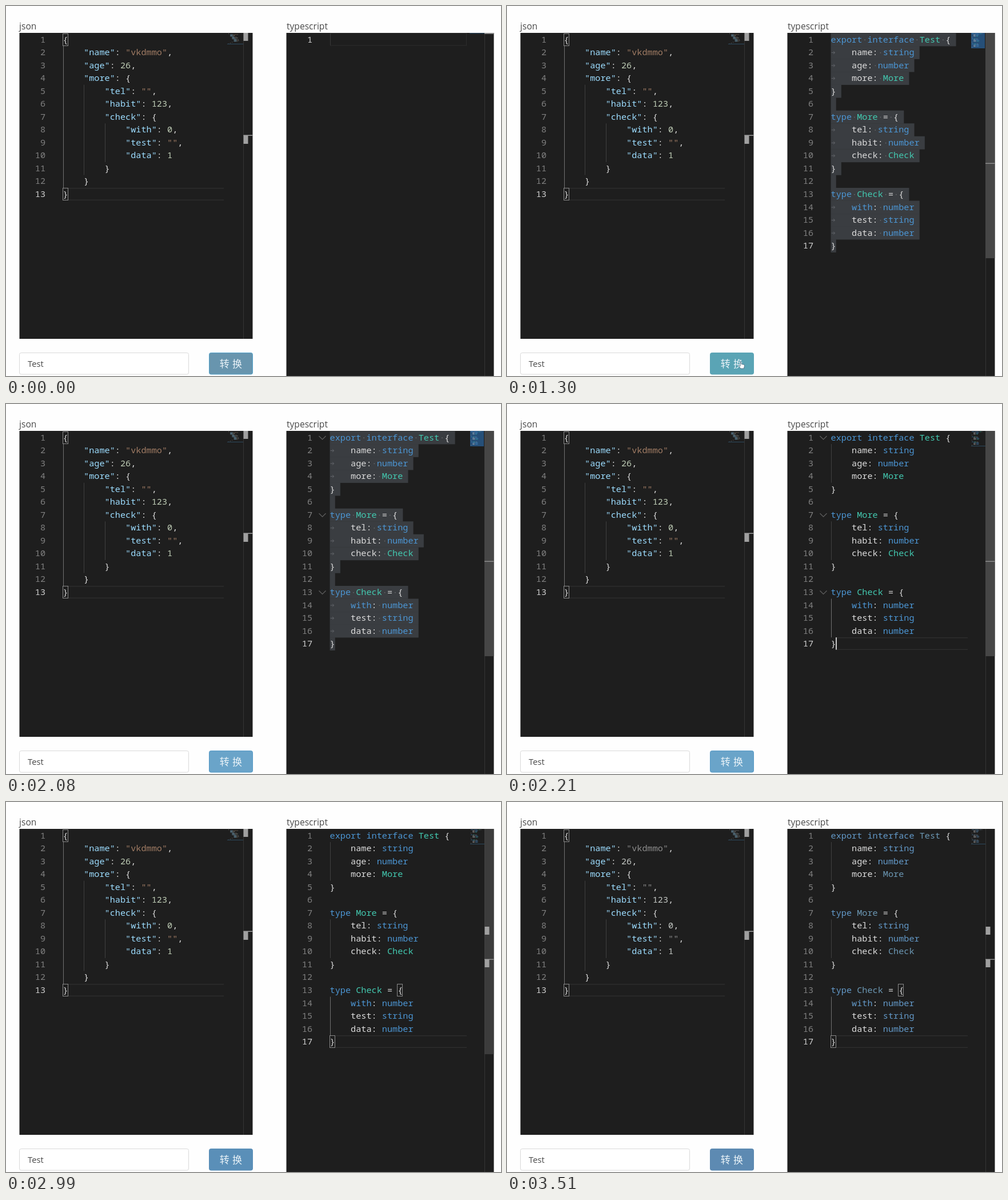
Animation, 866 px wide and 647 px high, one loop 3640 ms. Source, as an HTML page with a canvas:

```html
<!DOCTYPE html>
<html lang="en">
<head>
<meta charset="utf-8">
<title>json to typescript</title>
<style>
html, body { margin: 0; width: 100%; height: 100%; overflow: hidden; background: #fefefe; }
canvas { display: block; }
</style>
</head>
<body>
<canvas id="stage" width="866" height="647"></canvas>
<script>
const ctx = document.getElementById('stage').getContext('2d');
const LOOP = 3640, STEP = 130;
const TOP = 47.5, ROW = 22.54, COL = 9.125;
const MONO = '15.2px "Noto Sans Mono", "DejaVu Sans Mono", monospace';
const SANS = '"Open Sans", "Noto Sans", sans-serif';
const LEFT_X = 99.6, RIGHT_X = 566.6;

const json = `{
    "name": "vkdmmo",
    "age": 26,
    "more": {
        "tel": "",
        "habit": 123,
        "check": {
            "with": 0,
            "test": "",
            "data": 1
        }
    }
}`.split('\n');

const types = `export interface Test {
    name: string
    age: number
    more: More
}

type More = {
    tel: string
    habit: number
    check: Check
}

type Check = {
    with: number
    test: string
    data: number
}`.split('\n');

const bright = { key: '#9cdcfe', str: '#a07c64', num: '#bfcdb6', word: '#4c96d4', type: '#43c9b0', text: '#dcdcdc' };
const muted = { ...bright, str: '#8c8c8c', num: '#c4c8c4', word: '#6399c8', type: '#6c98b4' };

// Moments in ms
const T = { hand: 780, press: 1170, output: 1300, folds: 1820, click: 2210, match: 2340, caretOff: 2600, leave: 2600, fade: 2860, dull: 3380 };

const clamp = v => Math.max(0, Math.min(1, v));
const rowY = i => TOP + i * ROW;

function rect(x, y, w, h, color) {
  ctx.fillStyle = color;
  ctx.fillRect(x, y, w, h);
}

function box(x, y, w, h, color) {
  ctx.strokeStyle = color;
  ctx.lineWidth = 1;
  ctx.strokeRect(x, y, w, h);
}

function label(str, x, y, font, color, align = 'left') {
  ctx.font = font;
  ctx.fillStyle = color;
  ctx.textAlign = align;
  ctx.fillText(str, x, y);
}

function kindOf(token, rest) {
  if (token[0] === '"') return rest[0] === ':' ? 'key' : 'str';
  if (/^\d/.test(token)) return 'num';
  if (/^(export|interface|type|string|number|with)$/.test(token)) return 'word';
  return /^[A-Z]/.test(token) ? 'type' : 'text';
}

function tokens(line) {
  return [...line.matchAll(/"[^"]*"|\w+|[^\s\w]/g)].map(m => ({
    str: m[0], col: m.index, kind: kindOf(m[0], line.slice(m.index + m[0].length))
  }));
}

function code(lines, x, colors) {
  lines.forEach((line, i) => {
    for (const k of tokens(line)) label(k.str, x + k.col * COL, rowY(i) + 16, MONO, colors[k.kind]);
  });
}

function lineNumbers(count, x, active) {
  for (let i = 1; i <= count; i++) {
    label(i, x, rowY(i - 1) + 16, MONO, i === active ? '#cfcfcf' : '#808080', 'right');
  }
}

function guide(x, from, to, color) {
  rect(Math.round(x), rowY(from), 1, (to - from) * ROW, color);
}

function bracket(x, col, row) {
  box(Math.round(x + col * COL) - 0.5, Math.round(rowY(row)) + 0.5, 9, 21, '#8a8a8a');
}

function currentLine(x, end, row) {
  const y = Math.round(rowY(row));
  rect(x, y, end - x, 1.5, '#2d2d2d');
  rect(x, y + 20.5, end - x, 1.5, '#2d2d2d');
}

function minimap(lines, x, colors) {
  ctx.globalAlpha = 0.5;
  lines.forEach((line, i) => {
    for (const k of tokens(line)) rect(x + k.col * 0.8, 48 + i * 1.47, k.str.length * 0.75, 1, colors[k.kind]);
  });
  ctx.globalAlpha = 1;
}

function leftPane(colors) {
  rect(23.5, 47, 408, 535, '#1e1e1e');
  rect(415, 47, 1, 535, '#343434');
  lineNumbers(13, 69, 13);
  currentLine(109, 381, 12);
  guide(LEFT_X, 1, 12, '#707070');
  guide(LEFT_X + 4 * COL, 4, 11, '#404040');
  guide(LEFT_X + 8 * COL, 7, 10, '#404040');
  bracket(LEFT_X, 0, 0);
  bracket(LEFT_X, 0, 12);
  code(json, LEFT_X, colors);
  minimap(json, 389, colors);
  rect(387, 66, 28, 1, '#2c4a5e');
  rect(415.5, 47, 8, 14, '#a0a0a0');
  rect(415.5, 225.5, 16, 1.5, '#a0a0a0');
  rect(415.5, 226, 8, 15, '#a0a0a0');
}

function selection() {
  types.forEach((line, i) => {
    const cols = line.length + (i < types.length - 1 ? 1 : 0);
    rect(RIGHT_X, rowY(i), cols * COL, ROW + 0.3, '#3a3d41');
    [...line].forEach((ch, c) => {
      if (ch !== ' ') return;
      const x = RIGHT_X + c * COL, y = rowY(i) + 11;
      if (c >= 4) rect(x + 4, y, 1.5, 1.5, '#6a6d70');
      else if (c === 0) arrow(x + 1, y);
    });
  });
}

function arrow(x, y) {
  ctx.strokeStyle = '#62656a';
  ctx.lineWidth = 1;
  ctx.beginPath();
  ctx.moveTo(x, y + 0.5);
  ctx.lineTo(x + 6, y + 0.5);
  ctx.moveTo(x + 3.5, y - 2);
  ctx.lineTo(x + 6, y + 0.5);
  ctx.lineTo(x + 3.5, y + 3);
  ctx.stroke();
}

function folds(alpha) {
  ctx.globalAlpha = alpha;
  ctx.strokeStyle = '#606060';
  ctx.lineWidth = 1.2;
  for (const row of [0, 6, 12]) {
    const y = rowY(row) + 8.5;
    ctx.beginPath();
    ctx.moveTo(547.5, y);
    ctx.lineTo(553.5, y + 6);
    ctx.lineTo(559.5, y);
    ctx.stroke();
  }
  ctx.globalAlpha = 1;
}

function rightPane(t, colors) {
  rect(490.5, 47, 363, 600, '#1e1e1e');
  rect(837, 47, 1, 600, '#343434');
  if (t < T.output) {
    lineNumbers(1, 536, 1);
    box(567.5, 47.5, 238, 21.5, '#2d2d2d');
    rect(567, 48, 1, 21, '#383838');
    rect(811, 47, 26, 1.5, '#22384a');
    rect(837, 47, 16.5, 2, '#8c8c8c');
    return;
  }

  const selected = t < T.click;
  if (selected) {
    selection();
    rect(812, 47, 24, 27, '#264f78');
  } else {
    currentLine(577, 806, 16);
    guide(RIGHT_X, 1, 4, '#404040');
    guide(RIGHT_X, 7, 10, '#404040');
    guide(RIGHT_X, 13, 16, '#707070');
    rect(812, 73, 25, 1, '#2c4a5e');
  }
  lineNumbers(17, 536, 17);
  code(types, RIGHT_X, colors);
  minimap(types, 813, colors);

  folds(clamp((t - T.folds + STEP) / 260) * (1 - clamp((t - T.leave + STEP) / 500)));
  ctx.globalAlpha = 1 - clamp((t - T.fade) / 520);
  rect(837, 47, 16.5, 394, '#464646');
  ctx.globalAlpha = 1;

  rect(837, 274.5, 16.5, 1.5, '#8c8c8c');
  if (t >= T.match) {
    bracket(RIGHT_X, 13, 12);
    bracket(RIGHT_X, 0, 16);
    rect(837.5, 218, 8, 14, '#a0a0a0');
    rect(837.5, 275, 8, 14, '#a0a0a0');
  }
  if (t >= T.click && t < T.caretOff) rect(575, rowY(16), 2, 21.5, '#c8c8c8');
}

function rounded(x, y, w, h, fill, stroke) {
  ctx.beginPath();
  ctx.roundRect(x, y, w, h, 3);
  ctx.fillStyle = fill;
  ctx.fill();
  ctx.strokeStyle = stroke;
  ctx.lineWidth = 1;
  ctx.stroke();
}

function buttonColors(t) {
  if (t < T.press) return ['#6895ae', '#55a4cb'];
  if (t < 1950) return ['#5aa4b5', '#5aa4b5'];
  if (t < T.leave) return ['#6aa4c9', '#5599c6'];
  return t < T.dull ? ['#5a8fb8', '#5a8fb8'] : ['#5d8ab2', '#5a88b0'];
}

function form(t) {
  rounded(23.5, 606.5, 296, 37.5, '#ffffff', '#d9d9d9');
  label('Test', 38, 631, '14.8px ' + SANS, '#4a4a4a');
  rounded(355.5, 606.5, 76, 37.5, ...buttonColors(t));
  const cjk = '17px "Noto Sans CJK SC", "Noto Sans CJK", sans-serif';
  label('转', 382.3, 632, cjk, '#eaf3f8', 'center');
  label('换', 404.5, 632, cjk, '#eaf3f8', 'center');
}

function shape(x, y, points, line) {
  ctx.beginPath();
  points.forEach(([px, py]) => ctx.lineTo(x + px, y + py));
  ctx.closePath();
  ctx.fillStyle = '#ffffff';
  ctx.fill();
  ctx.strokeStyle = line;
  ctx.lineWidth = 1;
  ctx.stroke();
}

const ARROW = [[0, 0], [0, 12], [2.8, 9.5], [4.8, 14], [6.8, 13], [4.9, 8.8], [8.6, 8.6]];
const HAND = [[0, 0], [1.6, 0], [1.8, 4], [7, 5.2], [7.6, 7], [6.4, 12], [0.8, 12], [-2.6, 7.5], [-1.8, 6.6], [0, 8]];
const visits = [
  [[780, 401, 639], [1040, 404, 624], [1300, 408, 622], [1430, 428, 614], [1690, 495, 563], [1820, 520, 543]],
  [[2600, 492, 575], [2730, 453, 608], [2860, 428, 643]]
];

function pointer(t) {
  const path = visits.find(p => t >= p[0][0] && t < p[p.length - 1][0]);
  if (!path) return;
  const i = path.findIndex(p => p[0] > t);
  const [a, b] = [path[i - 1], path[i]];
  const u = (t - a[0]) / (b[0] - a[0]);
  const x = a[1] + (b[1] - a[1]) * u, y = a[2] + (b[2] - a[2]) * u;
  const onButton = x < 432 && y > 606;
  shape(x, y, onButton ? HAND : ARROW, onButton ? '#56788c' : '#55555f');
}

function draw(t) {
  const colors = t >= T.dull ? muted : bright;
  rect(0, 0, 866, 647, '#fefefe');
  label('json', 23, 41, '15.6px ' + SANS, '#4a4a4a');
  label('typescript', 491, 41, '15.6px ' + SANS, '#4a4a4a');
  leftPane(colors);
  rightPane(t, colors);
  form(t);
  pointer(t);
}

const start = performance.now();
function tick() {
  const t = (performance.now() - start) % LOOP;
  draw(Math.floor(t / STEP) * STEP);
  requestAnimationFrame(tick);
}
tick();
</script>
</body>
</html>
```
